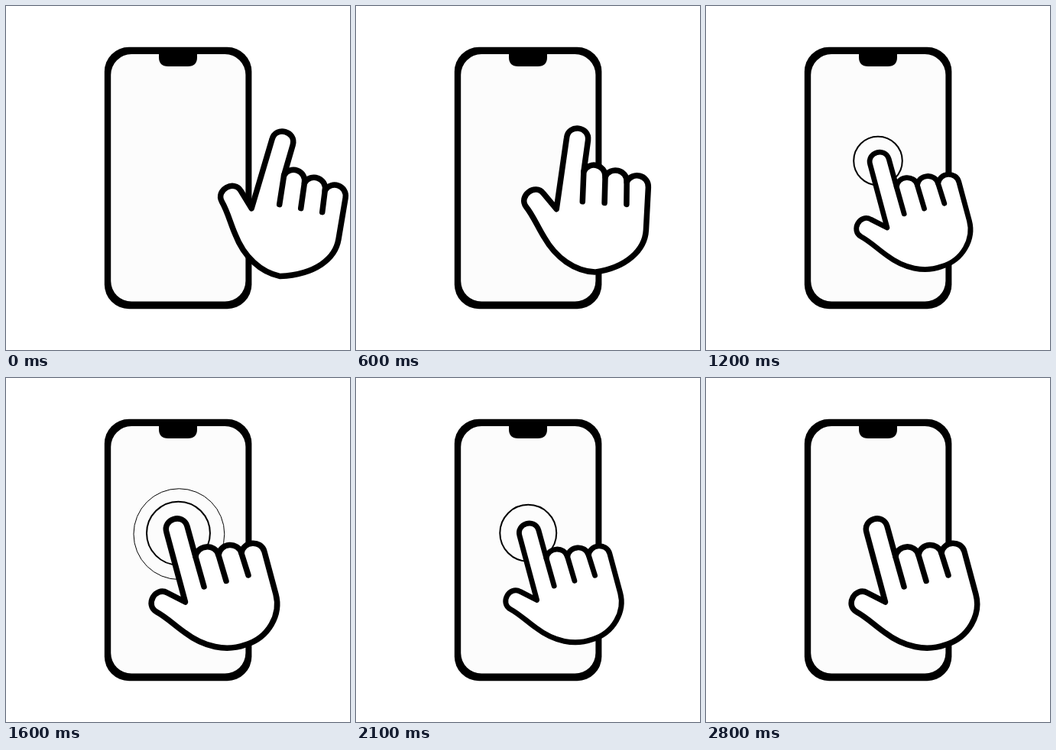
Animation, 450 px wide and 450 px high, one loop 4 s. Source, as an HTML page:

```html
<!DOCTYPE html>
<html lang="en">
<head>
<meta charset="utf-8">
<title>Tap on a phone</title>
<style>
  html, body { margin: 0; width: 100%; height: 100%; overflow: hidden; background: #fff; }
  svg { display: block; width: 100vw; height: 100vh; }
</style>
</head>
<body>
<svg viewBox="0 0 450 450">
  <rect x="128.8" y="53.8" width="192.6" height="342.4" rx="32"/>
  <rect x="137.2" y="63" width="176.2" height="323.6" rx="27" fill="#fcfcfc"/>
  <path d="M200 58H250V67Q250 79 238 79H212Q200 79 200 67Z"/>
  <g id="rings" fill="none" stroke="#000"></g>
  <g id="hand" stroke="#000" stroke-width="7.5" stroke-linecap="round" stroke-linejoin="round">
    <path id="outline" fill="#fff"/>
    <path id="creases" fill="none"/>
  </g>
</svg>
<script>
const LOOP = 4000, STEP = 100;
const TAPS = [1000, 1825];
const RING_LAG = 260;
const START = { x: 369, y: 293 }, END = { x: 290, y: 292 };
const TURN = 31.6, TILT = 7;      // degrees
const KNUCKLE = [-42, -58];       // first knuckle, measured from the palm centre

const $ = id => document.getElementById(id);
const lerp = (a, b, k) => a + (b - a) * k;
const add = (p, q, k = 1) => [p[0] + q[0] * k, p[1] + q[1] * k];
const text = (...points) => points.map(p => p.map(v => v.toFixed(2)).join(" ")).join(" ");

function ease(t, from, to) {
  const k = Math.min(1, Math.max(0, (t - from) / (to - from)));
  return (1 - Math.cos(Math.PI * k)) / 2;
}

function rotate([x, y], degrees) {
  const a = degrees * Math.PI / 180, c = Math.cos(a), s = Math.sin(a);
  return [x * c - y * s, x * s + y * c];
}

// Rounded tip from a to b; pinch draws its shoulders together.
function dome(a, b, height, pinch = 0) {
  const d = add(b, a, -1), len = Math.hypot(...d);
  const along = [d[0] / len, d[1] / len];
  const up = [along[1], -along[0]];
  return "C" + text(
    add(add(a, up, height), along, pinch),
    add(add(b, up, height), along, -pinch),
    b);
}

// With reach, the row of folded fingers closes up and tilts about its first knuckle.
function drawShape(reach) {
  const fan = p => add(KNUCKLE,
    rotate(add(p, KNUCKLE, -1), -TILT * reach), 1 - 0.05 * reach);
  const knuckle = i => add(KNUCKLE, [30, -2.3], i);

  const indexLeft = [-80, -90], indexRight = [-53, -98];
  const thumbLow = [-93, 14], thumbHigh = [-79, -11];
  let outline = "M-55.5 1L" + text(indexLeft) + dome(indexLeft, indexRight, 18.7)
    + "L" + text(KNUCKLE);
  let creases = "";
  for (let i = 0; i < 3; i++) {
    const k = knuckle(i);
    outline += dome(fan(k), fan(knuckle(i + 1)), 16, 3);
    creases += "M" + text(fan(k)) + "L" + text(fan(add(k, [11 - i, 39 - 5.2 * i])));
  }
  outline += "L" + text(fan([63, -9]))
    + "C" + text(fan([70, 17]), fan([54, 48]), [23, 57])
    + "C-2 66 -31 60 -56 41C-69 32 -80 21 " + text(thumbLow)
    + dome(thumbLow, thumbHigh, 18) + "Z";
  $("outline").setAttribute("d", outline);
  $("creases").setAttribute("d", creases);
}

function drawHand(t) {
  const move = ease(t, 0, 950);
  const reach = 1 - ease(t, 400, 980);
  const press = TAPS.reduce((sum, tap) =>
    sum + ease(t, tap - 50, tap + 200) - ease(t, tap + 200, tap + 500), 0);
  const x = lerp(START.x, END.x, move);
  const y = lerp(START.y, END.y, move) - 7 * Math.sin(Math.PI * move);
  drawShape(reach);
  $("hand").setAttribute("transform",
    `translate(261 261) scale(${1 - 0.093 * press}) translate(${x - 261} ${y - 261}) rotate(${TURN * reach})`);
}

const rings = TAPS.flatMap(tap => [tap, tap + RING_LAG]).map(start => {
  const el = document.createElementNS("http://www.w3.org/2000/svg", "circle");
  $("rings").append(el);
  return { el, start };
});

// Rings grow at a steady rate and thin out; the centre drifts slightly as they scale.
function drawRings(t) {
  for (const { el, start } of rings) {
    const r = 18 + 0.069 * (t - start);
    const shown = r > 22 && r < 66;
    el.setAttribute("visibility", shown ? "visible" : "hidden");
    if (!shown) continue;
    el.setAttribute("cx", 223.4 + 0.05 * r);
    el.setAttribute("cy", 200.6 + 0.06 * r);
    el.setAttribute("r", r);
    el.setAttribute("stroke-width", Math.min(2, (66.5 - r) * 0.14));
  }
}

function draw(t) {
  drawHand(t);
  drawRings(t);
}

let origin = null;
function frame(now) {
  if (origin === null) origin = now;
  draw(Math.floor(((now - origin) % LOOP) / STEP) * STEP);
  requestAnimationFrame(frame);
}
draw(0);
requestAnimationFrame(frame);
</script>
</body>
</html>
```
